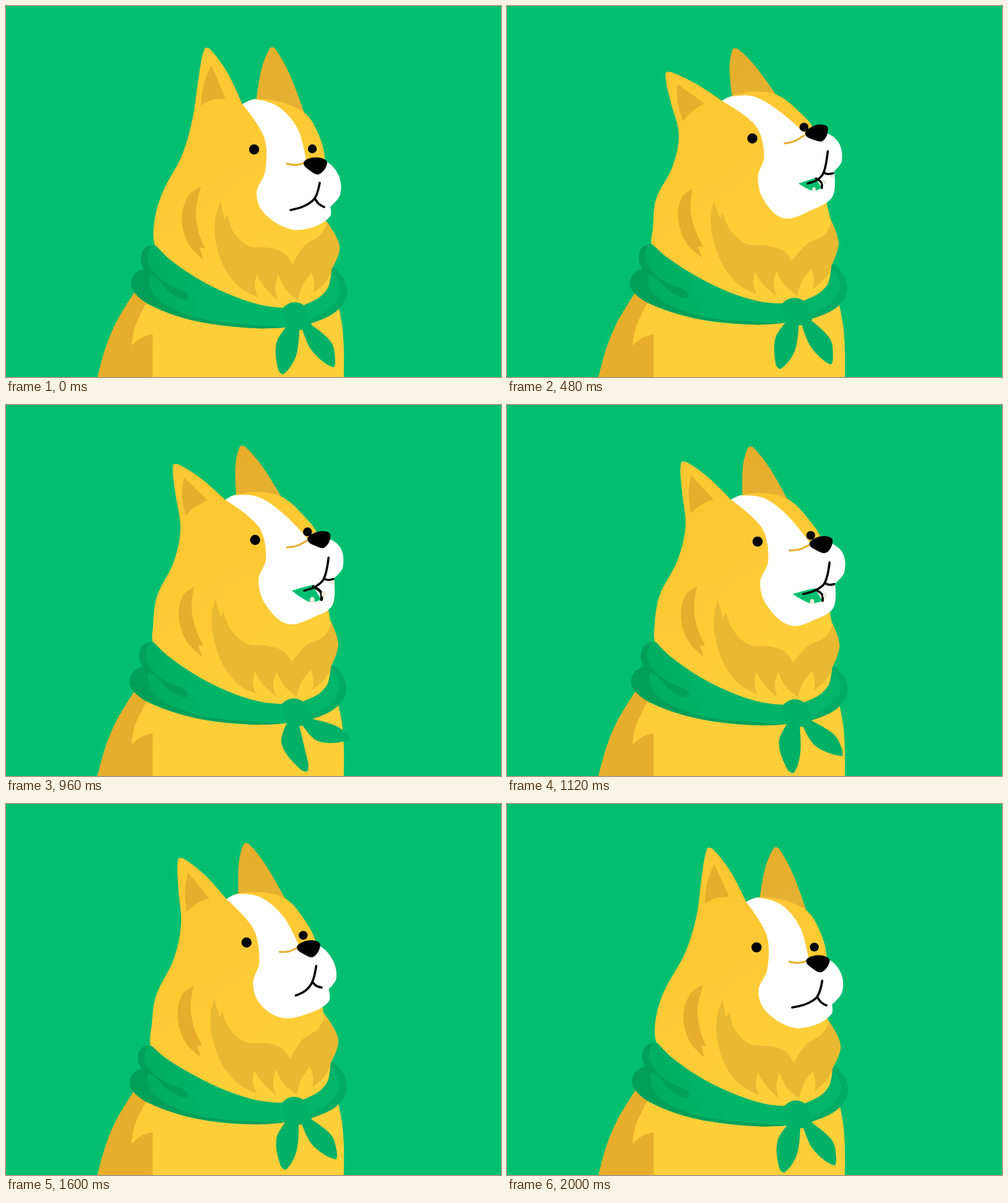
Write an HTML page with a canvas that moves like this. It is 800 px wide and 600 px high and loops after 2.08 s.

```html
<!DOCTYPE html>
<html lang="en">
<head>
<meta charset="utf-8">
<title>Barking dog</title>
<style>
html, body { margin: 0; width: 100%; height: 100%; overflow: hidden; background: #02bf70; }
canvas { display: block; }
</style>
</head>
<body>
<canvas id="stage" width="800" height="600"></canvas>
<script>
const ctx = document.getElementById('stage').getContext('2d');
const LOOP = 2080, STEP = 80;
const BG = '#02bf70', SHADE = '#e7ae2b', CHEST = '#e9b932', TOOTH = '#efebdc',
      SCARF = '#02b166', SCARF_DARK = '#00a058', SCARF_BACK = '#00ab63';

// Rig handles: x, y, shift when the head is raised, shift when it is pushed
// forward, and optionally the drop when the mouth opens.
const EARS = [
  [325,67, -90,56, 9,10],
  [302,180, -35,42, 15,0],
  [382,159, -49,-3, 15,-2],
  [431,67, -87,5, 15,11],
  [404,150, -58,-2, 13,2],
  [484,174, -66,-37, 5,-2]
];
const COAT = [
  [515,243, -30,-56, 11,0],
  [517,350, 2,-10, 12,15],
  [239,360, -7,6, 4,-2],
  [539,389, -5,-13, 1,10],
  [232,387, -12,3, 6,-8],
  [202,450, -5,3, 1,-5],
  [551,455, -2,-11, 0,5]
];
const KNOT = [467,497, -3,-12, 0,3.5];
const EYE = [401,232, -16,-24, 19,-1], FAR_EYE = [495,231, -28,-50, 14,3];
const NOSE = [500,258, -9,-71, 21,-2];
const MUZZLE = [
  [541,297, -7,-72, 14,-7],
  [524,325, 2,-78, 9,-4],
  [524,338, 0,-66, 7,-6, 20],
  [465,361, -25,-41, 15,4, 12],
  [405,303, -5,-35, 11,0]
];
const MOUTH = [
  [507,286, 5,-70, 21,-1],
  [499,311, 8,-61, 19,6],
  [460,330, 32,-67, 8,-9, 12]
];

// time, ears raised, ears forward, face raised, face forward, mouth open, tail swing
const KEYS = [
  [0, 0, 0, 0, 0, 0, 0],
  [320, 0, 1, 0, 1, 0.6, 0],
  [440, 0.57, 0.2, 0.55, 0.6, 1, -4],
  [560, 0.97, 0, 0.97, 0, 0, 4],
  [640, 1, 0, 1, 0, 0, 6.5],
  [720, 1, 0, 1, 0, 0, 8],
  [960, 0.57, 0, 0.55, 0.55, 1, 23],
  [1100, 0.45, 0.2, 0.42, 0.6, 0.9, 10],
  [1280, 0.97, 0, 0.97, 0, 0, 5.5],
  [1360, 1, 0, 1, 0, 0, 6.5],
  [1430, 1, 0, 1, 0, 0, 7],
  [1600, 0.46, -0.2, 0.35, -0.35, 0, 3],
  [2000, 0, 0.3, 0, 0.12, 0, 0],
  [LOOP, 0, 0, 0, 0, 0, 0]
];

// Monotone cubic between keys, so nothing overshoots.
function channel(c, t) {
  let k = 0;
  while (k < KEYS.length - 2 && t >= KEYS[k + 1][0]) k++;
  const rate = j => (KEYS[j + 1][c] - KEYS[j][c]) / (KEYS[j + 1][0] - KEYS[j][0]);
  const slope = j => {
    if (j < 1 || j > KEYS.length - 2) return 0;
    const a = rate(j - 1), b = rate(j);
    return a * b <= 0 ? 0 : 2 * a * b / (a + b);
  };
  const span = KEYS[k + 1][0] - KEYS[k][0], u = (t - KEYS[k][0]) / span, v = 1 - u;
  return KEYS[k][c] * v * v * (1 + 2 * u) + KEYS[k + 1][c] * u * u * (3 - 2 * u) +
         span * u * v * (slope(k) * v - slope(k + 1) * u);
}

const place = ([x, y, ux, uy, fx, fy, drop = 0], up, fwd, open = 0) =>
  [x + ux * up + fx * fwd, y + uy * up + fy * fwd + drop * open];

// Moving least squares: each point follows the handles near it.
function warper(handles) {
  const warp = (x, y) => {
    let W = 0, px = 0, py = 0, qx = 0, qy = 0;
    const ws = handles.map(([a, b, [c, d]]) => {
      const w = 1 / ((x - a) ** 2 + (y - b) ** 2 + 30) ** 2;
      W += w; px += w * a; py += w * b; qx += w * c; qy += w * d;
      return w;
    });
    px /= W; py /= W; qx /= W; qy /= W;
    let xx = 0, xy = 0, yy = 0, m = [0, 0, 0, 0];
    handles.forEach(([a, b, [c, d]], i) => {
      const w = ws[i], dx = a - px, dy = b - py, ex = c - qx, ey = d - qy;
      xx += w * dx * dx; xy += w * dx * dy; yy += w * dy * dy;
      m = [m[0] + w * dx * ex, m[1] + w * dx * ey, m[2] + w * dy * ex, m[3] + w * dy * ey];
    });
    const det = xx * yy - xy * xy, rx = x - px, ry = y - py;
    const u = (rx * yy - ry * xy) / det, v = (ry * xx - rx * xy) / det;
    return [qx + u * m[0] + v * m[2], qy + u * m[1] + v * m[3]];
  };
  return flat => mapPoints(flat, warp);
}
function mapPoints(flat, fn) {
  const out = [];
  for (let i = 0; i < flat.length; i += 2) out.push(...fn(flat[i], flat[i + 1]));
  return out;
}

// Smooth path through flat points; listed indices stay sharp.
function trace(flat, corners = [], closed = true) {
  const n = flat.length / 2;
  const pt = i => { const j = (i + n) % n; return [flat[2 * j], flat[2 * j + 1]]; };
  const handle = (i, dir, len) => {
    const p = pt(i);
    if (corners.includes(i % n) || (!closed && (i === 0 || i === n - 1))) return p;
    const a = pt(i - 1), b = pt(i + 1);
    const dx = b[0] - a[0], dy = b[1] - a[1], s = dir * len / 3 / (Math.hypot(dx, dy) || 1);
    return [p[0] + dx * s, p[1] + dy * s];
  };
  ctx.beginPath();
  ctx.moveTo(...pt(0));
  for (let i = 0; i < (closed ? n : n - 1); i++) {
    const a = pt(i), b = pt(i + 1), len = Math.hypot(b[0] - a[0], b[1] - a[1]);
    ctx.bezierCurveTo(...handle(i, 1, len), ...handle(i + 1, -1, len), ...b);
  }
  if (closed) ctx.closePath();
}
function fill(flat, color, corners) {
  trace(flat, corners);
  ctx.fillStyle = color;
  ctx.fill();
}
function line(flat, color, width) {
  trace(flat, [], false);
  ctx.strokeStyle = color;
  ctx.lineWidth = width;
  ctx.stroke();
}
function oval(x, y, rx, ry, color) {
  ctx.beginPath();
  ctx.ellipse(x, y, rx, ry, 0, 0, 7);
  ctx.fillStyle = color;
  ctx.fill();
}
function ramp(x0, y0, x1, y1, a, b) {
  const g = ctx.createLinearGradient(x0, y0, x1, y1);
  g.addColorStop(0, a);
  g.addColorStop(1, b);
  return g;
}

const fur = ramp(290, 200, 450, 430, '#ffc732', '#ffcf39');
const farFur = ramp(400, 80, 440, 160, '#e7ae2b', '#e5b133');
const cloth = ramp(240, 470, 330, 440, '#00ad60', '#00b568');

function drawBody() {
  fill([215,452, 179,510, 161,553, 148,600, 546,600, 546,555, 543,515, 534,470, 400,470],
    fur, [0, 3, 4, 7, 8]);
  fill([215,452, 179,510, 161,553, 148,600, 237,600, 237,531, 220,536, 203,549, 208,520, 227,480],
    SHADE, [0, 3, 4, 5, 7, 9]);
}

function drawHead(bend) {
  fill(bend([404,156, 413,102, 427,68, 435,69, 459,112, 484,178]), farFur, [0, 5]);
  const head = bend([321,69, 311,118, 302,180, 285,240, 252,304, 239,355, 243,392, 290,450, 450,495,
    515,465, 526,426, 539,389, 517,347, 515,310, 515,243, 504,205, 484,174, 446,156, 404,150,
    382,159, 358,108, 330,70]);
  const corners = [10, 12, 19];
  fill(head, fur, corners);
  ctx.save();
  trace(head, corners);
  ctx.clip();
  fill(bend([315,292, 294,308, 284,345, 295,385, 319,410, 313,391, 322,392, 311,365, 307,330]),
    SHADE, [0, 4, 5, 6]);
  fill(bend([347,316, 339,340, 338,375, 352,422, 378,455, 407,471, 402,452, 405,434, 418,455,
    439,476, 435,455, 440,434, 452,458, 472,476, 479,452, 494,431, 498,447, 497,464, 515,448,
    530,425, 560,400, 550,360, 522,345, 508,370, 482,388, 463,418, 450,400, 425,391, 392,388,
    368,366, 358,337, 353,346]), CHEST, [0, 5, 7, 9, 11, 13, 15, 17, 22, 25, 30, 31]);
  ctx.restore();
  fill(bend([332,95, 355,150, 333,152, 315,161, 320,125]), SHADE, [0, 1, 3]);
}

function drawMouth([top, corner, left], open, up) {
  const [cx, cy] = corner, [lx, ly] = left;
  const mx = (cx + lx) / 2, my = (cy + ly) / 2;
  const lip = [cx + 15, cy + 14 * (1 - up) * (1 - 0.9 * open)];
  if (open > 0.1) {
    const back = [cx - 17 * open, cy + 13 * open], end = [cx - 4 * open, cy + 34 * open];
    fill([lx - 20 * open, ly, mx, my, ...back, ...end, mx - 7 * open, my + 28 * open], BG, [0, 2, 3]);
    line([...back, end[0] - 1, end[1] - 12 * open, ...end], '#000', 4.5 * open);
    for (const [x, y] of [[mx - 3, my + 25 * open], [end[0] + 4, end[1] - 9], [lip[0] - 2, lip[1] + 4]])
      oval(x, y, 4 * open, 5 * open, TOOTH);
  }
  line([...top, ...corner, mx + 2.5, my + 3, ...left], '#000', 3.6);
  line([...corner, (cx + lip[0]) / 2 - 1, (cy + lip[1]) / 2 + 2, ...lip], '#000', 3.6);
}

function drawFace(bend, put, open, up) {
  fill(bend([382,159, 402,151, 442,164, 472,200, 485,250, 518,252, 538,275, 540,305, 524,325,
    524,340, 498,357, 460,361, 417,335, 405,302, 419,267, 417,212]), '#fff', [0, 4, 8]);
  drawMouth(MOUTH.map(put), open, up);
  line(bend([454,255, 468,257, 482,254]), SHADE, 3);
  oval(...put(EYE), 8.2, 8.2, '#000');
  oval(...put(FAR_EYE), 7.2, 7.2, '#000');
  ctx.save();
  ctx.translate(...put(NOSE));
  ctx.rotate(-0.38 * up);
  fill([-19,-4, -8,-12, 10,-12, 19,-4, 6,14, -9,8], '#000');
  ctx.restore();
}

function scarfBack(bend) {
  fill(bend([515,425, 532,424, 548,445, 551,468, 538,490, 515,505, 478,518, 470,495]),
    SCARF_BACK, [0, 1, 6, 7]);
}
function scarfFront(bend) {
  fill(bend([478,485, 508,470, 526,446, 528,430, 537,445, 540,462, 528,484, 500,503, 476,515]),
    '#02b569', [0, 3, 8]);
  const loop = [222,394, 218,412, 223,425, 208,433, 202,449, 207,463, 230,482];
  fill(bend([243,388, 231,387, ...loop, 275,501, 330,514, 400,521, 450,520, 478,516,
    480,484, 450,488, 410,483, 360,466, 310,441, 265,410]), cloth, [0, 4, 13, 14]);
  fill(bend([234,388, ...loop, 300,508, 400,521, 450,520, 400,516, 325,508, 268,489, 240,468,
    232,450, 235,435, 260,460, 294,472, 262,450, 240,432, 229,411]), SCARF_DARK, [0, 3, 10, 17]);
}

// Tails curl more the farther they are from the knot.
function drawTails([kx, ky], swing) {
  const curl = (x, y) => {
    const dx = x - 470, dy = y - 510;
    const a = -swing * Math.PI / 180 * Math.hypot(dx, dy) / 75;
    return [dx * Math.cos(a) - dy * Math.sin(a) + kx + 3, dx * Math.sin(a) + dy * Math.cos(a) + ky + 13];
  };
  fill(mapPoints([458,513, 437,545, 440,588, 449,595, 469,565, 474,520], curl), SCARF, [0, 5]);
  fill(mapPoints([478,520, 494,557, 528,584, 532,572, 525,543, 490,513], curl), SCARF, [0, 5]);
}

const RAYS = [[592,226, 641,187], [596,259, 664,249], [599,292, 656,308]];
function drawRays(t) {
  const age = t < 1200 ? t - 560 : t - 1280;
  if (age < 0 || age >= 240) return;
  const from = age < 160 ? 0 : 0.6, to = age < 80 ? 0.7 : 1;
  for (const [x, y, X, Y] of RAYS) {
    const at = k => [x + (X - x) * k, y + (Y - y) * k];
    line([...at(from), ...at(to)], '#fff', 6.5);
  }
}

function draw(t) {
  const [tilt, sway, nod, push, open, swing] = [1, 2, 3, 4, 5, 6].map(c => channel(c, t));
  const put = row => place(row, nod, push, open);
  const putEar = row => {
    const [x, y] = place(row, tilt, sway);
    return [x, y - 16 * tilt * (1 - tilt)];
  };
  const pin = fn => row => [row[0], row[1], fn(row)];
  const ears = EARS.map(pin(putEar));
  const coat = warper([...ears, ...[...COAT, KNOT].map(pin(put))]);
  const face = warper([...ears.slice(2), ...[EYE, FAR_EYE, NOSE, ...MUZZLE].map(pin(put))]);

  ctx.fillStyle = BG;
  ctx.fillRect(0, 0, 800, 600);
  drawBody();
  scarfBack(coat);
  drawHead(coat);
  drawFace(face, put, open, nod);
  scarfFront(coat);
  drawTails(put(KNOT), swing);
  fill(coat([447,492, 454,483, 467,479, 480,483, 488,493, 494,515, 477,524, 456,519]), SCARF, [5, 7]);
  drawRays(t);
}

ctx.lineCap = ctx.lineJoin = 'round';
const start = performance.now();
function tick() {
  const t = (performance.now() - start) % LOOP;
  draw(Math.floor(t / STEP) * STEP);
  requestAnimationFrame(tick);
}
tick();
</script>
</body>
</html>
```
